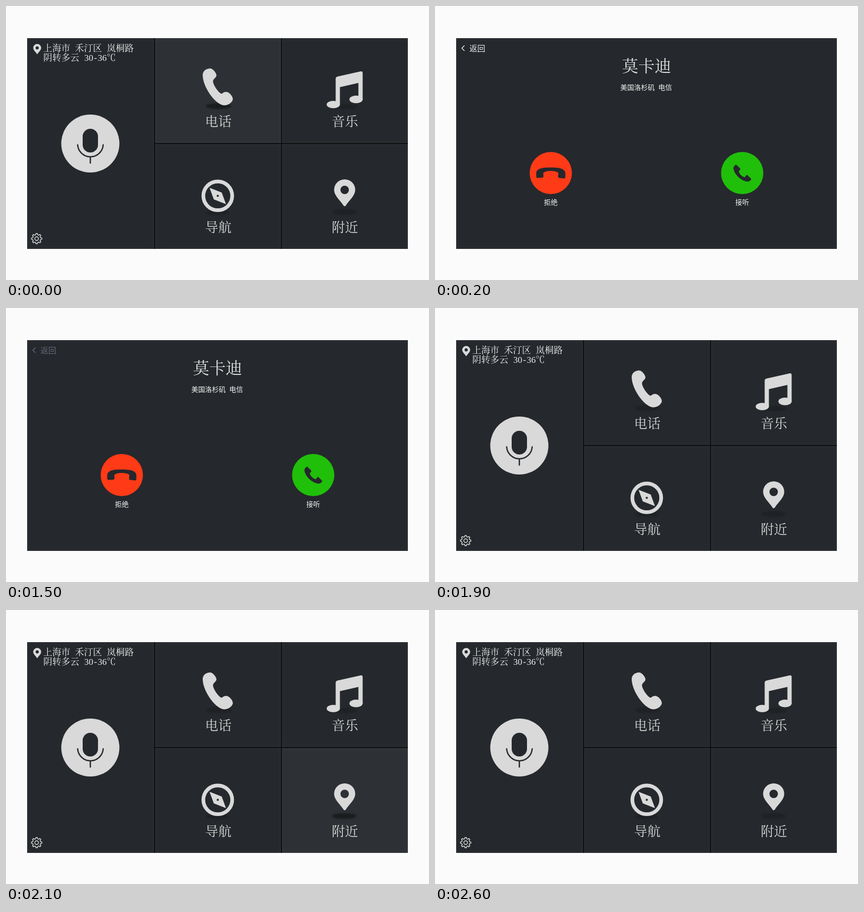
Recreate the animation shown at these times as an HTML page. Size 800 by 520 pixels, loop 2700 ms.

```html
<!DOCTYPE html>
<html lang="zh-CN">
<head>
<meta charset="utf-8">
<title>车载界面</title>
<style>
  html, body { margin: 0; width: 100%; height: 100%; overflow: hidden; background: #fbfbfb; }
  #stage { position: absolute; left: 0; top: 0; width: 800px; height: 520px; }
  .panel { position: absolute; left: 40px; top: 61px; width: 720px; height: 400px; background: #0e1012; }
  .tile { position: absolute; background: #25282c; box-shadow: inset 0 0 9px rgba(255, 255, 255, .045); }
  .tile.hot { background: #2d3034; }
  svg { position: absolute; left: 0; top: 0; }
  .icon { fill: #d9d9d9; }
  .dark { fill: #25282c; }
  .line { fill: none; stroke: #25282c; stroke-width: 2.5; stroke-linecap: round; }
  .shade { fill: #17191b; opacity: .4; filter: blur(1.5px); }
  .shade.hot { opacity: .85; }
  .label, .caller { font-family: "Noto Serif CJK SC", "Noto Serif SC", "Noto Sans CJK SC", "Noto Sans CJK", serif; fill: #d9d9d9; }
  .label { font-size: 25px; font-weight: 500; }
  .caller { font-size: 31px; fill: #dedede; }
  .info { font: 17px "Liberation Serif", "Noto Serif CJK SC", "Noto Sans CJK SC", "Noto Sans CJK", serif; fill: #f0f0f0; }
  .small { font: 500 13px "Noto Sans CJK SC", "Noto Sans CJK", sans-serif; fill: #f4f4f4; }
  .back { font: 15px "Noto Sans CJK SC", "Noto Sans CJK", sans-serif; color: #ececec; }
  .back.pressed { color: #656678; }
  .back text { fill: currentColor; }
  .back path { fill: none; stroke: currentColor; stroke-width: 1.4; }
</style>
</head>
<body>
<div id="stage">
  <div id="home">
    <div class="panel">
      <div class="tile" style="left:0;top:0;width:240px;height:400px"></div>
      <div class="tile" id="phone" style="left:242px;top:0;width:238px;height:199px"></div>
      <div class="tile" style="left:482px;top:0;width:238px;height:199px"></div>
      <div class="tile" style="left:242px;top:201px;width:238px;height:199px"></div>
      <div class="tile" id="nearby" style="left:482px;top:201px;width:238px;height:199px"></div>
    </div>
    <svg width="800" height="520" viewBox="0 0 800 520">
      <defs>
        <path id="pin" fill-rule="evenodd" d="M-2 30 C-8 20 -20 11 -20 0 A20 20 0 0 1 20 0 C20 11 8 20 2 30 Q0 32 -2 30Z M8 0 A8 8 0 1 0 -8 0 A8 8 0 1 0 8 0Z"/>
      </defs>

      <use href="#pin" class="icon" transform="translate(59 79.5) scale(.375)"/>
      <g class="info">
        <text x="70.5" y="86">上海市</text>
        <text x="130.5" y="86">禾汀区</text>
        <text x="190.5" y="86">岚桐路</text>
        <text x="70.5" y="104">阴转多云</text>
        <text x="148" y="104">30</text>
        <text x="166.5" y="104">-</text>
        <text x="173.5" y="104">36</text>
        <text x="190.5" y="104">℃</text>
      </g>

      <circle class="icon" cx="159.5" cy="261" r="55"/>
      <rect class="dark" x="145" y="233" width="29" height="45" rx="14.5"/>
      <path class="line" d="M135.5 263.5 A24.2 24.2 0 0 0 183.8 263.5 M159.5 288 V298"/>
      <g fill="none" stroke="#d9d9d9" stroke-width="1.4" stroke-linejoin="round">
        <path id="gear"/>
        <circle cx="58" cy="441.5" r="3.5"/>
      </g>

      <ellipse class="shade" id="phoneShade" cx="402" cy="190" rx="24" ry="5.5"/>
      <path class="icon" d="M385 118.5 C391 118 397 126 398 131 C398.5 136 391.5 138 391.5 143 C391.5 149 400 162 406 166 C410 167.5 410 163 416 163 C422 163 429 171 429 177 C428 183 420 189 412 188.5 C394 186 372 152 372 131 C372 124 378 119 385 118.5Z"/>
      <text class="label" x="376.5" y="228">电话</text>

      <ellipse class="shade" cx="642" cy="191" rx="22" ry="5"/>
      <g class="icon">
        <path d="M623.5 187 V138 Q623.5 135 626.5 134 L671 124 Q674.5 123.5 674.5 127 V178 H666.5 V146 L631.5 154 V187Z"/>
        <ellipse cx="619" cy="187" rx="12.5" ry="7"/>
        <ellipse cx="662" cy="177.3" rx="12.5" ry="7.2"/>
      </g>
      <text class="label" x="616" y="228">音乐</text>

      <ellipse class="shade" cx="400" cy="392" rx="22" ry="4.5"/>
      <circle cx="400.5" cy="360.3" r="27.3" fill="none" stroke="#d9d9d9" stroke-width="7"/>
      <path class="icon" d="M385 345 L408 354 L416 376 L393 367Z"/>
      <circle class="dark" cx="400.5" cy="360.3" r="2"/>
      <text class="label" x="376.5" y="429">导航</text>

      <ellipse class="shade" id="nearbyShade" cx="640" cy="391" rx="23" ry="5.5"/>
      <use href="#pin" class="icon" transform="translate(640.5 349)"/>
      <text class="label" x="616" y="429">附近</text>
    </svg>
  </div>

  <div id="call">
    <div class="panel"><div class="tile" style="left:0;top:0;width:720px;height:400px"></div></div>
    <svg width="800" height="520" viewBox="0 0 800 520">
      <g class="back" id="back">
        <path d="M55.7 75 L50.7 80 L55.7 85"/>
        <text x="65" y="85.5">返回</text>
      </g>
      <text class="caller" x="353.5" y="125">莫卡迪</text>
      <g class="small">
        <text x="350.5" y="159">美国洛杉矶</text>
        <text x="422.3" y="159">电信</text>
        <text x="206" y="377">拒绝</text>
        <text x="568" y="377">接听</text>
      </g>
      <circle cx="219" cy="317" r="40" fill="#ff3a17"/>
      <path class="dark" d="M191.5 320 C190 307.5 204 306.5 219 306.5 C234 306.5 248 308 246.5 320 V325 Q246.5 327.5 244 327.3 L235 326.3 Q232.5 326 232.7 323.5 L233.5 317 C229 311.8 209 311.8 204.8 317 L205.2 323 Q205.2 325.6 203 325.8 L194 326.3 Q191.5 326.3 191.5 324Z"/>
      <circle cx="581" cy="317" r="40" fill="#20bf0a"/>
      <path class="dark" d="M569.5 301 L577 308 Q578.5 310 574.5 313.5 C575 318 581 324.5 586 325 Q589 319.5 591 321 L598 328 C598 331 594 334 589 333 C578 331 566 319 564.5 309 C564 305 567 302 569.5 301Z"/>
    </svg>
  </div>
</div>
<script>
  const LOOP = 2700;
  const $ = id => document.getElementById(id);

  // start time, visible screen, active control
  const steps = [
    [0, 'home', 'phone'],
    [100, 'call', ''],
    [1500, 'call', 'back'],
    [1900, 'home', ''],
    [2100, 'home', 'nearby'],
    [2200, 'home', '']
  ];

  function gearPath(cx, cy, teeth) {
    const points = [];
    for (let i = 0; i < teeth; i++) {
      for (const [offset, r] of [[-.3, 7.6], [-.18, 9.9], [.18, 9.9], [.3, 7.6]]) {
        const a = (i + offset) / teeth * 2 * Math.PI;
        points.push((cx + r * Math.sin(a)).toFixed(2) + ' ' + (cy - r * Math.cos(a)).toFixed(2));
      }
    }
    return 'M' + points.join('L') + 'Z';
  }
  $('gear').setAttribute('d', gearPath(58, 441.5, 8));

  function render(time) {
    const [, screen, active] = steps.filter(step => step[0] <= time).pop();
    for (const id of ['home', 'call']) $(id).style.display = id === screen ? 'block' : 'none';
    for (const id of ['phone', 'nearby']) {
      $(id).classList.toggle('hot', id === active);
      $(id + 'Shade').classList.toggle('hot', id === active);
    }
    $('back').classList.toggle('pressed', active === 'back');
  }

  const start = performance.now();
  function tick() {
    render((performance.now() - start) % LOOP);
    requestAnimationFrame(tick);
  }
  tick();
</script>
</body>
</html>
```
